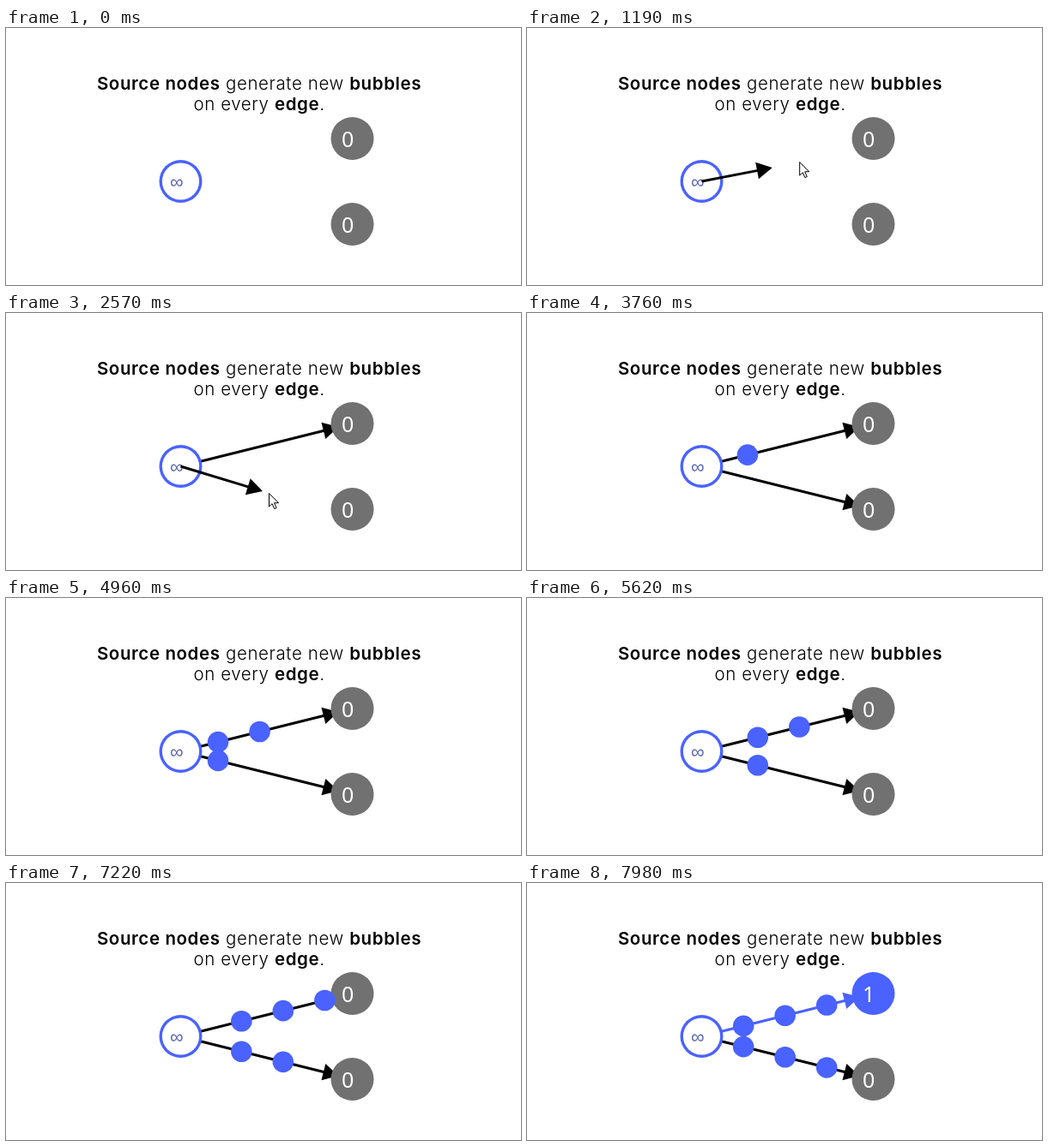
An HTML page with a canvas for the animation above (8000 ms loop, 600x300 px).

```html
<!DOCTYPE html>
<html lang="en">
<head>
<meta charset="utf-8">
<title>Source nodes</title>
<style>
  html, body { margin: 0; width: 100%; height: 100%; overflow: hidden; background: #fff; }
  canvas { display: block; }
</style>
</head>
<body>
<canvas id="stage" width="600" height="300"></canvas>
<script>
const ctx = document.getElementById('stage').getContext('2d');
const LOOP = 8000, BLUE = '#4a62ff', GRAY = '#717171', BLACK = '#000';
const NODE_R = 25, BUBBLE_R = 12.3, SPACING = 50, DRAG_LAG = 65;

const source = { x: 203.5, y: 179 };
const sinks = [
  { x: 403.5, y: 129, grabbedAt: 980, linkedAt: 1500, skipped: 0 },
  { x: 403.5, y: 229, grabbedAt: 2240, linkedAt: 3050, skipped: 1 },
];

// Each cursor move eases from the previous stop to this one.
const entry = { x: 368, y: 296 }, grip = { x: 205, y: 181 };
const moves = [
  { start: 460, end: 830, to: grip },
  { start: 980, end: 1500, to: { x: 412, y: 135 } },
  { start: 1790, end: 2090, to: grip },
  { start: 2240, end: 2560, to: { x: 306, y: 210 } },
  { start: 2600, end: 3020, to: { x: 410, y: 230 } },
  { start: 3050, end: 3450, to: { x: 385, y: 300 } },
];

const clamp = k => Math.min(1, Math.max(0, k));
const easeOut = k => 1 - (1 - k) ** 1.5;

function cursorAt(t) {
  const p = { ...entry };
  for (const { start, end, to } of moves) {
    const k = easeOut(clamp((t - start) / (end - start)));
    p.x += (to.x - p.x) * k;
    p.y += (to.y - p.y) * k;
  }
  return p;
}

// Distance covered by the first bubble, speeding up very slightly.
function flowAt(t) {
  const s = (t - 3760) / 1000;
  return 30 + 32.75 * s + 0.39 * s * s;
}

function along(to, distance) {
  const dx = to.x - source.x, dy = to.y - source.y, length = Math.hypot(dx, dy);
  return { x: source.x + dx / length * distance, y: source.y + dy / length * distance };
}

function bubblesOn(sink, flow) {
  const travel = Math.hypot(sink.x - source.x, sink.y - source.y) - 2 * NODE_R;
  const moving = [];
  let arrived = 0;
  for (let d = flow - sink.skipped * SPACING; d >= 0; d -= SPACING) {
    if (d >= travel) arrived++;
    else moving.push(along(sink, NODE_R + d));
  }
  return { moving, arrived };
}

function disc(p, r, color) {
  ctx.fillStyle = color;
  ctx.beginPath();
  ctx.arc(p.x, p.y, r, 0, 2 * Math.PI);
  ctx.fill();
}

function label(text, p, font, color, baseline) {
  ctx.font = font;
  ctx.fillStyle = color;
  ctx.fillText(text, p.x - 12.5, p.y + baseline);
}

function arrow(tip, color) {
  const dx = tip.x - source.x, dy = tip.y - source.y, length = Math.hypot(dx, dy);
  ctx.save();
  ctx.translate(source.x, source.y);
  ctx.rotate(Math.atan2(dy, dx));
  ctx.fillStyle = color;
  ctx.fillRect(0, -1.5, Math.max(0, length - 16), 3);
  ctx.beginPath();
  ctx.moveTo(length, 0);
  ctx.lineTo(length - 18, -10);
  ctx.lineTo(length - 18, 10);
  ctx.fill();
  ctx.restore();
}

function pointer(p) {
  ctx.save();
  ctx.translate(p.x + 0.5, p.y + 0.5);
  ctx.fillStyle = '#fff';
  ctx.strokeStyle = BLACK;
  const shape = new Path2D('M0 0V15.5L3.6 12.2L6.2 18L8.6 17L6 11.2H11Z');
  ctx.fill(shape);
  ctx.stroke(shape);
  ctx.restore();
}

// Centred line of text; runs between asterisks are bold.
function titleLine(text, y) {
  const runs = text.split('*').map((run, i) => {
    const font = `${i % 2 ? 600 : 300} 20.5px Inter, "Open Sans", sans-serif`;
    ctx.font = font;
    return { run, font, width: ctx.measureText(run).width };
  });
  let x = 295 - runs.reduce((sum, { width }) => sum + width, 0) / 2;
  ctx.fillStyle = BLACK;
  for (const { run, font, width } of runs) {
    ctx.font = font;
    ctx.fillText(run, x, y);
    x += width;
  }
}

function draw(t) {
  const flows = sinks.map(sink => bubblesOn(sink, flowAt(t)));
  ctx.fillStyle = '#fff';
  ctx.fillRect(0, 0, 600, 300);

  ctx.letterSpacing = '0.6px';
  titleLine('*Source nodes* generate new *bubbles*', 72);
  titleLine('on every *edge*.', 96);
  ctx.letterSpacing = '0px';

  sinks.forEach((sink, i) => {
    const color = flows[i].arrived ? BLUE : GRAY;
    if (t >= sink.linkedAt) arrow(along(sink, 189.5), flows[i].arrived ? BLUE : BLACK);
    disc(sink, NODE_R, color);
    label(flows[i].arrived, sink, '25px "Noto Sans", sans-serif', '#fff', 10);
  });
  disc(source, NODE_R, BLUE);
  disc(source, NODE_R - 3.4, '#fff');
  label('∞', source, '22px "Liberation Sans", sans-serif', '#5a68b0', 7.5);

  for (const { moving } of flows) moving.forEach(p => disc(p, BUBBLE_R, BLUE));

  if (sinks.some(s => t >= s.grabbedAt + DRAG_LAG && t < s.linkedAt)) {
    arrow(cursorAt(t - DRAG_LAG), BLACK);
  }
  if (t >= moves[0].start && t < moves.at(-1).end) pointer(cursorAt(t));
}

function frame() {
  draw(performance.now() % LOOP);
  requestAnimationFrame(frame);
}
frame();
</script>
</body>
</html>
```
